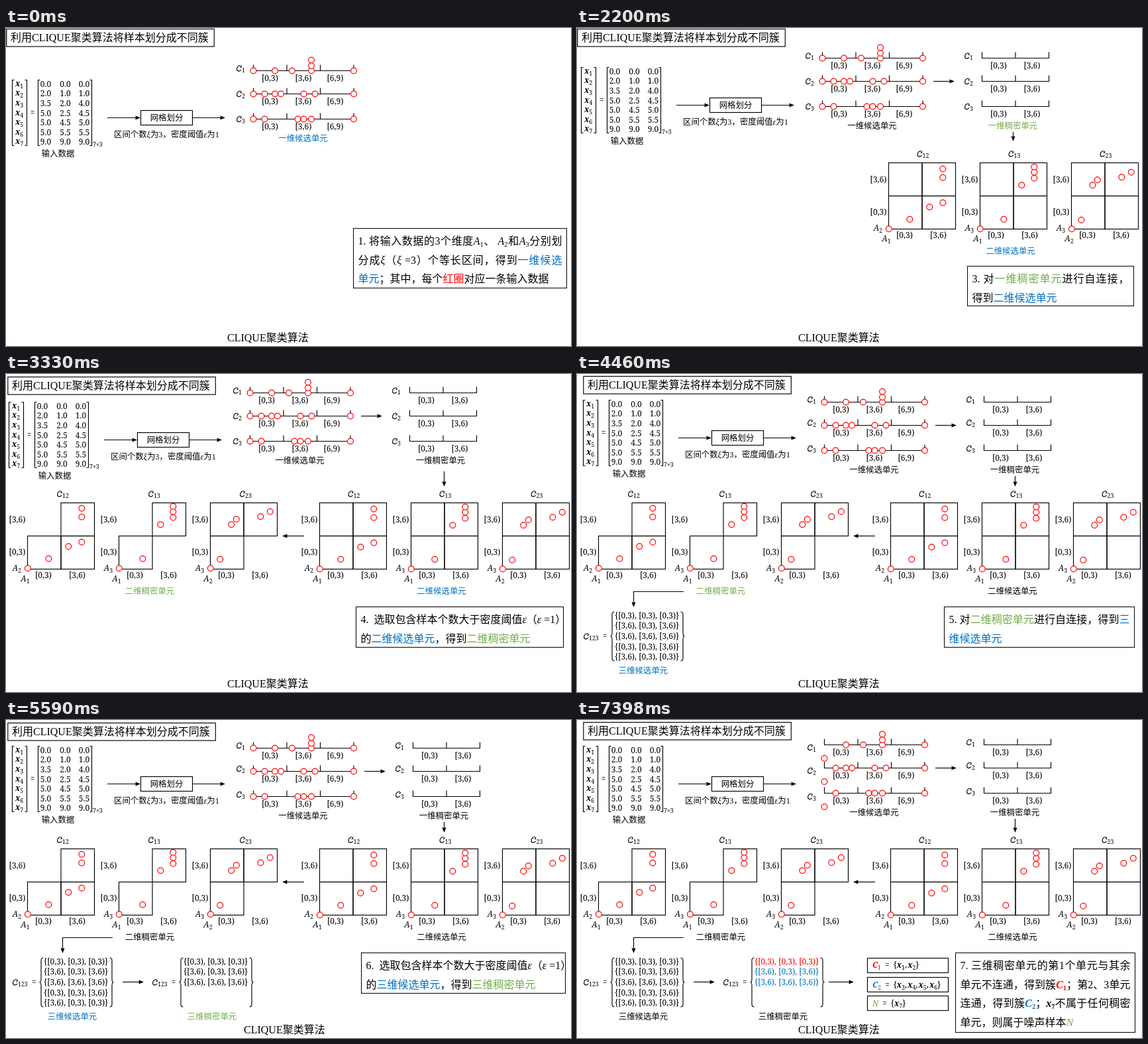
Recreate the animation shown at these times as an HTML page. Size 853 by 480 pixels, loop 7.85 s.

```html
<!DOCTYPE html>
<html lang="zh-CN">
<head>
<meta charset="utf-8">
<title>CLIQUE聚类算法</title>
<style>
  html, body { margin: 0; width: 100%; height: 100%; overflow: hidden; background: #fff; }
  .scene { position: absolute; left: 0; top: 0; width: 853px; height: 480px; background: #fff; overflow: hidden; }
  svg { position: absolute; left: 0; top: 0; }
  path, rect { fill: none; stroke: #000; stroke-width: 1.15; }
  .head { fill: #000; stroke: none; }
  circle { fill: #fff; stroke: #f00; stroke-width: 1.2; }
  text { font: 12.4px "Liberation Serif", "Noto Sans CJK SC", "Noto Sans CJK", serif; text-anchor: middle; }
  .big { font-size: 16px; }
  .math { font: 12px "Noto Serif", serif; }
  .left { text-anchor: start; }
  .sub { font-size: 8.8px; font-style: normal; font-weight: 400; baseline-shift: -2.5px; }
  .i { font-style: italic; }
  .b { font-style: italic; font-weight: 700; }
  .note {
    position: absolute; box-sizing: border-box; padding: 5px 6.5px 0; border: 1.2px solid #000;
    font: 16px/28.6px "Liberation Serif", "Noto Sans CJK SC", "Noto Sans CJK", serif;
    white-space: nowrap; text-spacing-trim: space-all;
  }
  .just { text-align: justify; text-align-last: justify; }
  .note sub { font-size: 10.5px; line-height: 0; vertical-align: -2.5px; }
  .red { color: #f00; fill: #f00; }
  .blue { color: #0070c0; fill: #0070c0; }
  .green { color: #70ad47; fill: #70ad47; }
</style>
</head>
<body>
<script>
const LOOP = 7850, FIRST = 1070, STEP = 1130;

// Drawing helpers; y is the visual middle of a text
const text = (x, y, s, cls = '') => `<text x="${x}" y="${y}" dy=".36em" class="${cls}">${s}</text>`;
const math = (x, y, s, cls = '') => text(x, y, s, 'math ' + cls);
const span = (s, cls) => `<tspan class="${cls}">${s}</tspan>`;
const sym = (s, n, cls = 'i') => span(s + span(n, 'sub'), cls);
const path = d => `<path d="${d}"/>`;
const rect = (x, y, w, h) => `<rect x="${x}" y="${y}" width="${w}" height="${h}"/>`;
const dot = (x, y) => `<circle cx="${x}" cy="${y}" r="4.4"/>`;
const group = (x, y, s) => `<g transform="translate(${x} ${y})">${s}</g>`;
const list = (items, f) => items.map(f).join('');

const scriptC = (x, y, n) =>
  group(x, y - 4.5, path('M7.4 1.6C7.3 3 6 3.4 5.5 2.6M7.4 1.6C7.2 .5 6.4 .2 5.3 .2C2.4 .2 .6 3 .6 5.6C.6 7.6 1.7 8.6 3.4 8.6C5 8.6 6.3 7.8 7 6.5')) +
  math(x + 8, y - 1, span(n, 'sub'), 'left');

function arrow(x1, y1, x2, y2) {
  const u = Math.sign(x2 - x1), v = Math.sign(y2 - y1);
  const bx = x2 - 7.5 * u, by = y2 - 7.5 * v;
  return path(`M${x1} ${y1}L${bx} ${by}`) +
    `<path class="head" d="M${x2} ${y2}L${bx - 3 * v} ${by - 3 * u}L${bx + 3 * v} ${by + 3 * u}z"/>`;
}

const square = (x, s, y = 78.5, h = 99) => path(`M${x + 3 * s} ${y}H${x}v${h}h${3 * s}`);

const DATA = ['0.0 0.0 0.0', '2.0 1.0 1.0', '3.5 2.0 4.0', '5.0 2.5 4.5', '5.0 4.5 5.0', '5.0 5.5 5.5', '9.0 9.0 9.0'];

function input() {
  const rows = list(DATA, (row, i) => {
    const y = 84.5 + 14.6 * i;
    return math(14, y - 1, sym('x', i + 1, 'b'), 'left') +
      list(row.split(' '), (v, k) => math([60, 89.5, 118][k], y, v));
  });
  return square(9.5, 1) + square(31.5, -1) + square(48.5, 1) + square(129.5, -1) + rows +
    math(40, 128, '=') + math(131, 172, span('7×3', 'sub'), 'left') + text(78.5, 190, '输入数据') +
    arrow(153, 135.5, 203, 135.5) + rect(203.5, 124.5, 78, 22) + text(242.5, 135.5, '网格划分') +
    arrow(282, 135.5, 331, 135.5) +
    text(242.5, 161, `区间个数${span('ξ', 'i')}为3，密度阈值${span('ε', 'i')}为1`);
}

// One-dimensional units
const ROWS = [64.5, 99.5, 137.5], UNIT = 50.5;
const RANGES = ['[0,3)', '[3,6)', '[6,9)'];
const SAMPLES = [
  [373.5, 406, 432, 461, 525],
  [373.5, 390.5, 406, 415, 449.5, 466.5, 525],
  [373.5, 390.5, 440.5, 449.5, 461, 525],
];

function axis(x, y, n) {
  const ticks = list([...Array(n - 1).keys()], k => `M${x + UNIT * (k + 1)} ${y}v-9`);
  return path(`M${x} ${y - 9}v9h${UNIT * n}v-9${ticks}`) +
    list(RANGES.slice(0, n), (r, k) => math(x + [25, 75.5, 123.5][k], y + 11.5, r));
}

const candidates1 = (offs, dropped, color) => list(ROWS, (y, i) =>
  axis(373.5, y, 3) + scriptC(348, y + offs[i], i + 1) +
  list(SAMPLES[i], (x, k) => dot(x, dropped && !k ? y + 20.5 : y)) +
  (i ? '' : dot(461, y - 7.5) + dot(461, y - 16))
) + text(448.5, 167, '一维候选单元', color);

const dense1 = (offs, color) => list(ROWS, (y, i) =>
  axis(614.5, y, 2) + scriptC(588, y + offs[i], i + 1)
) + arrow(541, 99.5, 573, 99.5) + text(661, 167, '一维稠密单元', color);

// Two-dimensional units: names, points, dense cells
const PLANES = [
  ['12', [[0, 0], [31.5, 14.5], [61.5, 33], [81.5, 39.5], [81.5, 77.5], [81.5, 90.5]], [[0, 0], [1, 0], [1, 1]]],
  ['13', [[0, 0], [35.5, 14.5], [62.5, 66], [81.5, 76.5], [81.5, 85.5], [81.5, 93.5]], [[0, 0], [1, 1]]],
  ['23', [[0, 0], [14.5, 13.5], [31.5, 66], [39, 74], [75.5, 78], [90, 85.5]], [[0, 0], [0, 1], [1, 1]]],
];
const ALL = [[0, 0], [1, 0], [0, 1], [1, 1]];

const planes = (x, y, dense) => list(PLANES, ([name, points, cells], i) => group(x + 138 * i, y,
  list(dense ? cells : ALL, ([a, b]) => rect(a * UNIT, -50 * (b + 1), UNIT, 50)) +
  list(points, ([px, py]) => dot(px + .3, -py - (dense ? 1.2 : .3))) +
  scriptC(dense ? 44.5 : 43, -113.5, name) +
  math(-15.5, -75, RANGES[1]) + math(-15.5, -25.5, RANGES[0]) +
  math(24, 9, RANGES[0]) + math(75, 9, RANGES[1]) +
  math(-16, -2, sym('A', name[1])) + math(-3.5, 14, sym('A', name[0]))
));

// Three-dimensional units
const CUBES = ['000', '101', '111', '001', '100'];

function brace(x, s) {
  return path(`M${x + 6 * s} 359q${-3.5 * s} 0 ${-3.5 * s} 4V391q0 5 ${-2.5 * s} 5q${2.5 * s} 0 ${2.5 * s} 5V429q0 4 ${3.5 * s} 4`);
}

const cubes = (x, n, colors, label, labelColor) => group(x, 0,
  scriptC(10, 396, '123') + math(42, 396, '=') + brace(50.5, 1) + brace(162.5, -1) +
  list(CUBES.slice(0, n), (c, i) =>
    math(57, 364.5 + 15.6 * i, `{${[...c].map(d => RANGES[d]).join(', ')}}`, 'left ' + (colors[i] || ''))) +
  text(100, 448, label, labelColor));

const members = ids => `&ensp;=&ensp;{${ids.map(i => sym('x', i, 'b')).join(',&hairsp;')}}`;
const clusters = () =>
  arrow(380, 395.5, 418, 395.5) +
  rect(438.5, 359.5, 122, 22) + math(446, 370, sym('C', 1, 'b red') + members([1, 2]), 'left') +
  rect(438.5, 388.5, 122, 22) + math(446, 399.5, sym('C', 2, 'b blue') + members([3, 4, 5, 6]), 'left') +
  rect(438.5, 416.5, 122, 22) + math(446, 427.5, span('N', 'i green') + members([7]), 'left');

// Notes: box x, y, w, h, then lines; a leading "~" justifies the line
const em = s => `<i>${s}</i>`;
const bold = (s, n) => `<b>${em(s)}<sub>${n}</sub></b>`;
const hue = (c, s) => `<span class="${c}">${s}</span>`;
const pick = (n, d) => [
  `${n}选取包含样本个数大于密度阈值${em('ε')}（${em('ε')} =1）`,
  `的${hue('blue', d + '维候选单元')}，得到${hue('green', d + '维稠密单元')}`,
];
const NOTES = [
  [524, 302, 323, 91,
    `~1. 将输入数据的3个维度${em('A')}<sub>1</sub>、 ${em('A')}<sub>2</sub>和${em('A')}<sub>3</sub>分别划`,
    `~分成${em('ξ')}（${em('ξ')} =3）个等长区间，得到${hue('blue', '一维候选')}`,
    `${hue('blue', '单元')}；其中，每个${hue('red', '红圈')}对应一条输入数据`],
  [521, 283, 321, 62, ...pick('2. ', '一')],
  [589, 359, 252, 61, `~3. 对${hue('green', '一维稠密单元')}进行自连接，`, `得到${hue('blue', '二维候选单元')}`],
  [528, 351, 314, 62, ...pick('4.&nbsp; ', '二')],
  [554, 351, 288, 62, `~5. 对${hue('green', '二维稠密单元')}进行自连接，得到${hue('blue', '三')}`, hue('blue', '维候选单元')],
  [536, 351, 309, 62, ...pick('6.&nbsp; ', '三')],
  [571, 351, 272, 121,
    '~7. 三维稠密单元的第1个单元与其余',
    `~单元不连通，得到簇${hue('red', bold('C', 1))}；第2、3单元`,
    `~连通，得到簇${hue('blue', bold('C', 2))}；${bold('x', 7)}不属于任何稠密`,
    `单元，则属于噪声样本${hue('green', em('N'))}`],
];
const note = ([x, y, w, h, ...lines]) =>
  `<div class="note" style="left:${x}px;top:${y}px;width:${w}px;height:${h}px">` +
  list(lines, s => s[0] === '~' ? `<div class="just">${s.slice(1)}</div>` : `<div>${s}</div>`) + '</div>';

// Per scene: title x, y; shift x; input shift y; axes shift y; down arrow x, y1, y2
const LAYOUT = [
  [0, 1, 0, 0, 0],
  [0, 0, -3, -12, -12, 658.5, 165, 197],
  [0, 1, -3, -19, -19, 658.5, 157, 171],
  [2, 4, -5, -36, -36, 661.5, 147, 170],
  [9, 3, 0, -39, -22, 661.5, 154, 170],
  [2, 4, 0, -39, -22, 661.5, 154, 170],
  [9, 3, 0, -39, -27, 661.5, 149, 170],
];

function scene([tx, ty, dx, inputY, axesY, ax, ay1, ay2], n) {
  const offs = n < 4 ? [-3.5, 0, 0] : [-4, -4, -3];
  const last = n === 6;
  const until = (k, color) => n <= k ? color : '';
  let s = rect(tx + .8, ty + .5, 313.5, 26.5) +
    text(tx + 7, ty + 13.3, '利用CLIQUE聚类算法将样本划分成不同簇', 'big left') +
    text(n === 5 ? 359 : 334, 467.5, 'CLIQUE聚类算法', 'big left') +
    group(dx, inputY, input()) +
    group(dx, axesY, candidates1(last ? [4, 4, 5] : offs, last, until(1, 'blue')));
  if (n > 0) s += group(dx, axesY, dense1(offs, until(2, 'green'))) + arrow(ax, ay1, ax, ay2);
  if (n > 1) s += group(n > 2 ? 0 : -3, n > 2 ? 0 : 9,
    planes(473.5, 294.5) + text(657.5, 327.5, '二维候选单元', until(3, 'blue')));
  if (n > 2) s += arrow(450, 244.5, 417, 244.5) + planes(32.5, 294.5, true) +
    text(217, 327.5, '二维稠密单元', until(4, 'green'));
  if (n > 3) s += path('M161 328.5H85.5V332') + arrow(85.5, 331, 85.5, 352) +
    cubes(0, 5, [], '三维候选单元', until(5, 'blue'));
  if (n > 4) s += arrow(176, 395.5, 208, 395.5) +
    cubes(211, 3, last ? ['red', 'blue', 'blue'] : [], '三维稠密单元', until(5, 'green'));
  if (last) s += clusters();
  const anim = n ? ` style="animation:show${n} ${LOOP}ms step-end infinite"` : '';
  return `<div class="scene"${anim}><svg width="853" height="480">${s}</svg>${note(NOTES[n])}</div>`;
}

// Each scene covers the earlier ones from its start to the end of the loop
const frames = list(LAYOUT.slice(1), (_, i) =>
  `@keyframes show${i + 1}{0%{visibility:hidden}${(FIRST + STEP * i) / LOOP * 100}%,to{visibility:visible}}`);
document.body.innerHTML = `<style>${frames}</style>` + list(LAYOUT, scene);
</script>
</body>
</html>
```
